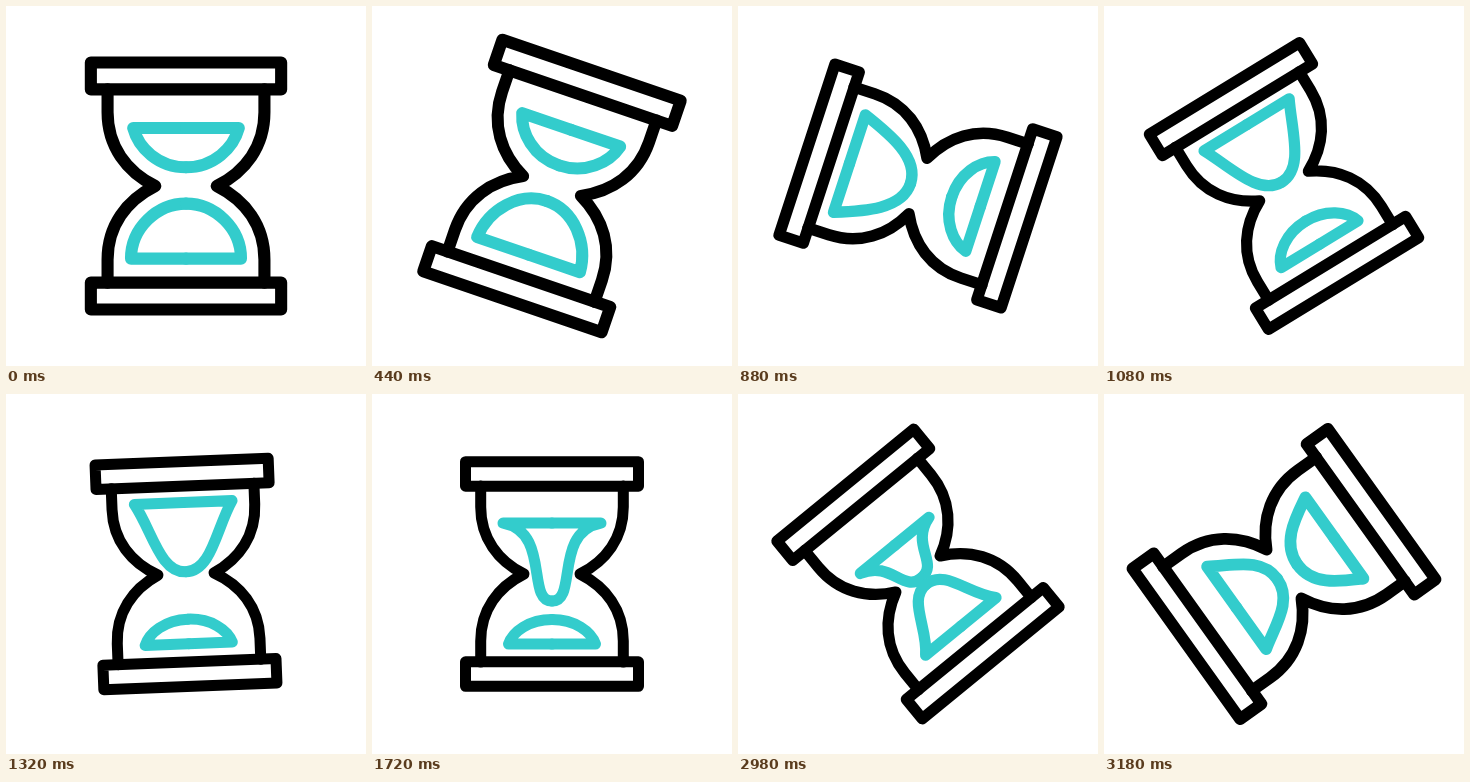
Write an HTML page that moves like this. It is 360 px wide and 360 px high and loops after 3.2 s.

```html
<!DOCTYPE html>
<html lang="en">
<head>
<meta charset="utf-8">
<title>Hourglass</title>
<style>
  html, body { margin: 0; width: 100%; height: 100%; overflow: hidden; background: #fff; }
  svg { display: block; width: 100vw; height: 100vh; }
</style>
</head>
<body>
<svg viewBox="-180 -180 360 360" fill="none" stroke="#000" stroke-width="11" stroke-linecap="round" stroke-linejoin="round">
  <g id="glass">
    <path d="M-86.5-112.3H86.5V-87.8H-86.5ZM-86.5 112.3H86.5V87.8H-86.5Z"/>
    <g id="half">
      <path d="M71.3-88V-67C71.3-36 54-13 28 0C54 13 71.3 36 71.3 67V88"/>
      <path id="upper" stroke="#3cc"/>
      <path id="lower" stroke="#3cc"/>
    </g>
    <use href="#half" transform="scale(-1 1)"/>
  </g>
  <path id="streaks" stroke="#3cc"/>
  <use href="#streaks" transform="scale(-1 1)"/>
</svg>
<script>
const LOOP = 3200;
const $ = id => document.getElementById(id);
const ease = (t, start, length) => {
  const x = Math.min(1, Math.max(0, (t - start) / length));
  return x * x * (3 - 2 * x);
};

// Each sand body: flat level, half width, tip, bulge (1 = round, 0 = pinched).
const rest = { upper: [-66, 50, -16, 1], lower: [52.7, 48, 17, 0.9] };
const turned = { upper: [-71.5, 48.8, -2, 0.65], lower: [70, 43.5, 45.5, 0.9] };
const pouring = { upper: [-48.6, 49, 30.4, -0.04], lower: turned.lower };
const settled = { upper: [-27.8, 41.5, 11, 0.07], lower: [70, 43.5, 11.5, 0.49] };

const moves = [
  { to: turned, start: 200, length: 1200 },
  { to: pouring, start: 1400, length: 400 },
  { to: settled, start: 1800, length: 900 },
  { to: rest, start: 2800, length: 600 }
];

// Right half of a sand outline; the left half is its mirror image.
function sandPath(t, part) {
  const [level, width, tip, bulge] = moves.reduce((pose, { to, start, length }) => {
    const p = ease(t, start, length);
    return pose.map((v, i) => v + (to[part][i] - v) * p);
  }, rest[part]);
  const bend = level + (tip - level) * (0.1 + 0.45 * bulge);
  return `M0 ${level}H${width}C${width * bulge} ${bend} ${width * 0.53} ${tip} 0 ${tip}`;
}

// Two passes of falling dashes beside the glass.
function streakPath(t) {
  const start = 1830, period = 425, travel = 138;
  const u = t - start;
  if (u <= 0 || u >= 2 * period) return '';
  const head = travel * ease(u % period, 0, 340);
  const tail = travel * ease(u % period, 80, 340);
  if (head - tail < 0.5) return '';
  return [[112, -89], [133.3, -25]]
    .map(([x, y]) => `M${x} ${y + tail}V${y + head}`).join('');
}

function draw(now) {
  const t = now % LOOP;
  const turn = ease(t, 200, 1200) - ease(t, 2800, 600);
  $('glass').setAttribute('transform', `rotate(${180 + 180 * turn}) scale(${1.1 - 0.1 * turn})`);
  for (const part of ['upper', 'lower']) $(part).setAttribute('d', sandPath(t, part));
  $('streaks').setAttribute('d', streakPath(t));
  requestAnimationFrame(draw);
}
draw(performance.now());
</script>
</body>
</html>
```
